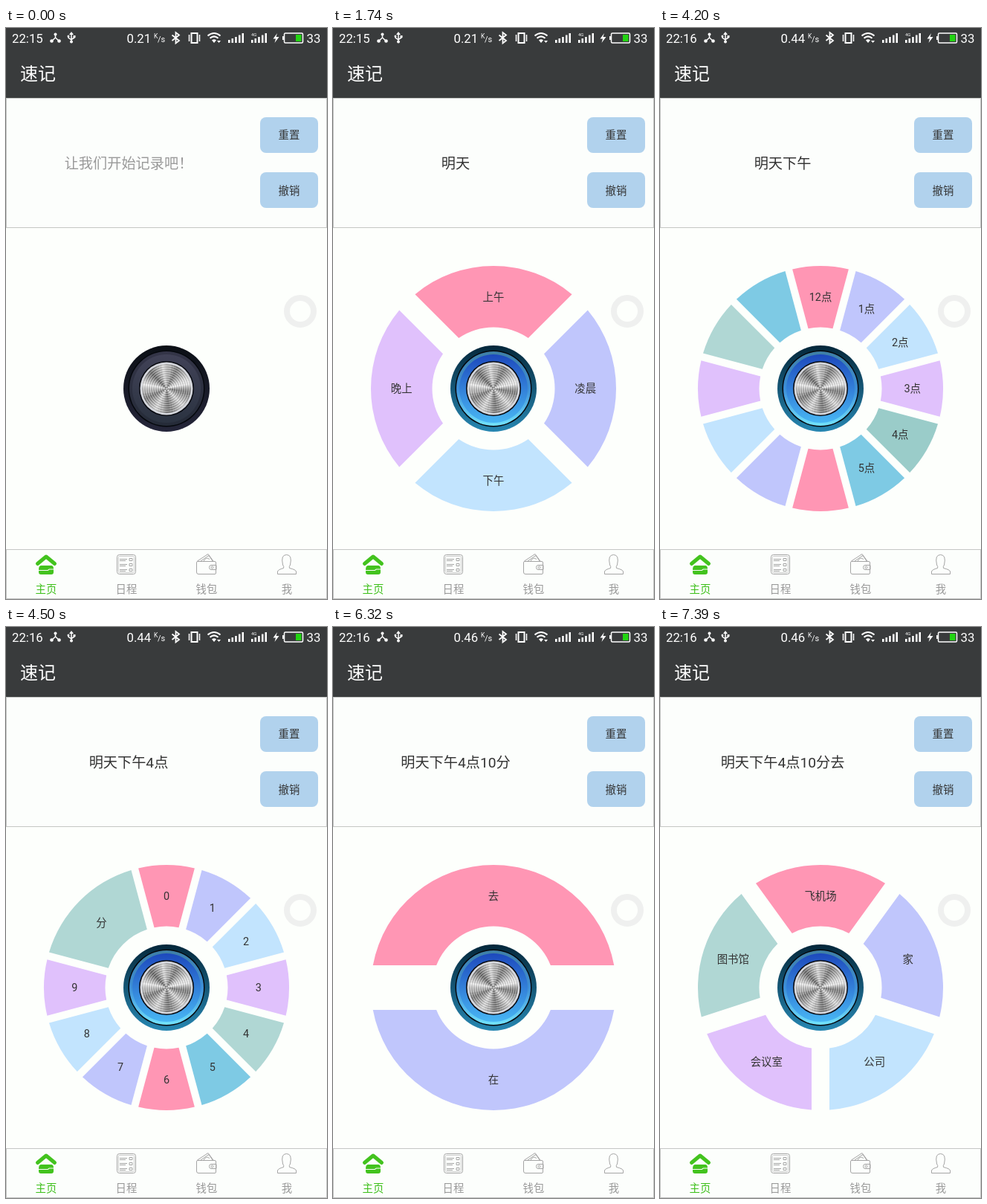
These frames come from a looping animation (432x768 px, 8 s). An HTML page:

```html
<!DOCTYPE html>
<html lang="zh-CN">
<head>
<meta charset="utf-8">
<style>
  html, body { margin: 0; width: 100%; height: 100%; overflow: hidden; background: #fdfffc; }
  svg { display: block; width: 100vw; height: 100vh; }
  text { font: 14.4px Roboto, "Noto Sans CJK SC", "Noto Sans CJK", sans-serif; fill: #333; }
  .mid { text-anchor: middle; }
  .status text { font-size: 16.8px; fill: #fff; }
  .tabs text { fill: #999; }
  .metal {
    width: 66px; height: 66px; border-radius: 50%;
    background:
      repeating-radial-gradient(circle, #fff4 0 1px, #0002 1.5px 2.5px, #fff4 3px),
      conic-gradient(from -8deg, #ddd, #777 36deg, #ddd 72deg, #eee 85deg, #777 108deg, #ddd 144deg,
        #777 180deg, #ddd 216deg, #777 252deg, #eee 288deg, #666 324deg, #ddd);
  }
</style>
</head>
<body>
<svg viewBox="0 0 432 768">
  <defs>
    <linearGradient id="offRim" x2="0" y2="1"><stop stop-color="#0b0f15"/><stop offset="1" stop-color="#25263a"/></linearGradient>
    <linearGradient id="offRing" x2="0" y2="1"><stop stop-color="#343548"/><stop offset="1" stop-color="#252b38"/></linearGradient>
    <linearGradient id="offCore" x2="0" y2="1"><stop stop-color="#414257"/><stop offset="1" stop-color="#2b3341"/></linearGradient>
    <linearGradient id="onRim" x2="0" y2="1"><stop stop-color="#04273a"/><stop offset="1" stop-color="#2787b2"/></linearGradient>
    <linearGradient id="onRing" x2="0" y2="1"><stop stop-color="#3e7fa5"/><stop offset=".5" stop-color="#3d8fd8"/><stop offset="1" stop-color="#72e2fc"/></linearGradient>
    <linearGradient id="onCore" x2="0" y2="1"><stop stop-color="#1d49bd"/><stop offset="1" stop-color="#48b6f4"/></linearGradient>
  </defs>
  <rect width="432" height="768" fill="#fdfffc"/>
  <rect width="432" height="94" fill="#393b3c"/>

  <g class="status" fill="none" stroke="#fff" stroke-width="1.5">
    <g stroke="none">
      <text id="clock" x="8" y="19.5"></text>
      <text id="speed" x="162.5" y="19.5"></text>
      <text x="199" y="14" style="font-size:8.5px">K</text>
      <text x="204" y="18.5" style="font-size:11px">/s</text>
      <text x="404.5" y="19.5">33</text>
      <text x="330" y="10.5" style="font-size:6px">4G</text>
    </g>
    <path d="M66.500 8V13L61 18M66.500 13L72 18"/>
    <g fill="#fff" stroke="none">
      <circle cx="66.500" cy="8.500" r="2"/><circle cx="61.500" cy="17.500" r="2.300"/><circle cx="71.500" cy="17.500" r="2.300"/>
      <path d="M88 5L91 9H85Z"/><circle cx="88" cy="18.500" r="2"/><circle cx="84" cy="11" r="1.500"/><path d="M90.500 10h3v3h-3z"/>
      <path d="M365 7L359.500 14.500H363L361.500 20L367.500 12H363.500Z"/>
      <path d="M299 16h2.500v4H299zM303.500 14H306v6h-2.500zM308.200 12h2.500v8h-2.500zM313 9.500h2.500V20H313zM317.500 7h2.500v13h-2.500z"/>
      <path d="M330 16h2.500v4H330zM334.500 14H337v6h-2.500zM339.200 12h2.500v8h-2.500zM344 9.500h2.500V20H344zM348.500 7h2.500v13h-2.500z"/>
      <path d="M277 16.500Q280 14 283 16.500L280 20Z"/><path d="M284 17h5l-2.500 3z"/>
      <rect x="372" y="11" width="2" height="5"/>
      <rect x="390" y="9" width="7.500" height="9" fill="#22d412"/>
    </g>
    <path d="M88 7V18M84 11V13L88 16M92 12V13L88 15.500"/>
    <path d="M223.500 9.500L233 17L228.500 20.500V6L233 9.500L223.500 17" stroke-width="1.800"/>
    <rect x="249.500" y="7" width="8" height="13" stroke-width="2"/><path d="M246.500 9V18M260.500 9V18"/>
    <path d="M271.500 10.500Q280 3.500 288.500 10.500M274.500 13.800Q280 9 285.500 13.800" stroke-width="2"/>
    <rect x="374.500" y="7" width="25" height="13" rx="1.500"/>
  </g>
  <text x="19" y="69.500" style="font-size:24px;fill:#fff">速记</text>

  <rect x=".5" y="94.500" width="431" height="174" fill="#fcfefc" stroke="#c4c6c4"/>
  <text id="note" class="mid" x="165" y="188.500" style="font-size:19.2px"></text>
  <g fill="#b1d2ed">
    <rect x="342" y="120" width="78" height="48" rx="8"/>
    <rect x="342" y="194" width="78" height="48" rx="8"/>
  </g>
  <text class="mid" x="381" y="149.300">重置</text>
  <text class="mid" x="381" y="223.800">撤销</text>

  <circle cx="396" cy="381" r="18" fill="none" stroke="#eff0ef" stroke-width="8"/>
  <g id="wheel"></g>

  <g transform="translate(216 485)">
    <circle id="rim" r="58"/>
    <circle r="51.500" fill="#05080d"/>
    <circle id="ring" r="50"/>
    <circle id="core" r="46"/>
    <circle r="37" fill="#080a10"/>
    <circle r="35.500" fill="#d5d7dd"/>
    <foreignObject x="-33" y="-33" width="66" height="66"><div class="metal"></div></foreignObject>
  </g>

  <rect x=".5" y="701.500" width="431" height="66" fill="#fcfefc" stroke="#c4c6c4"/>
  <g class="tabs mid">
    <text x="54" y="760" style="fill:#3fc01c">主页</text>
    <text x="162" y="760">日程</text>
    <text x="270" y="760">钱包</text>
    <text x="378" y="760">我</text>
  </g>
  <path d="M42.500 720.500L54 711L65.500 720.500" fill="none" stroke="#43c31e" stroke-width="5" stroke-linecap="round" stroke-linejoin="round"/>
  <path d="M47 723H61Q64 723 64 727.500H58L56 729H44Q44 723 47 723ZM44 730H56.500L58.500 728.500H64V732Q64 735 61 735H47Q44 735 44 732Z" fill="#43c31e"/>
  <g fill="none" stroke="#a5a5a5">
    <rect x="149.500" y="708.500" width="25" height="26" rx="3"/>
    <rect x="151.500" y="710.500" width="21" height="22" rx="1" stroke="#ccc"/>
    <path d="M153 714.500h10M153 716.500h8M153 721.500h10M153 723.500h8M153 728.500h10M153 730.500h8"/>
    <path d="M166 713.500h4v3h-4zM166 720.500h4v3h-4zM166 727.500h4v3h-4z"/>
    <path d="M257.500 717.500H281Q282.500 717.500 282.500 719V733Q282.500 734.500 281 734.500H259Q256.500 734.500 256.500 732V719Q256.500 717.500 259 716L272 707.500L279 717M262 717L273 709.500L278 717M266 717Q269 711 274 714.500"/>
    <path d="M283 722.500H276Q273.500 722.500 273.500 725.500T276 728.500H283Z"/><circle cx="277.500" cy="725.500" r="1.500"/>
    <path d="M365.500 734.500V731Q366 728.500 373.500 726.500Q374.500 725 372.500 722Q369.500 708.500 377.500 708.500T382.500 722Q380.500 725 381.500 726.500Q390 728.500 390.500 731V734.500Z"/>
  </g>
</svg>

<script>
const $ = id => document.getElementById(id);
const LOOP = 8000, OUTER = 165, INNER = 82.5;
const COLORS = ["#ff96b4", "#c0c6fc", "#c2e4fe", "#e0c1fc", "#b0d7d4", "#7ecae4"];
const PRESSED = ["#ff769e", "#a8b0fb", "#a9d9fe", "#d3a9fb", "#9accc9", "#5dbcdd"];

// A menu is cut into equal units; its last label takes all units left over.
const menu = (units, labels) => ({ units, labels: labels.split(" ") });
const DAYS = menu(6, "今天 明天 后天 现在 自定义时间");
const PARTS = menu(4, "上午 凌晨 下午 晚上");
const HOURS = menu(12, "12点 1点 2点 3点 4点 5点      ");
const MINUTES = menu(12, "0 1 2 3 4 5 6 7 8 9 分");
const VERBS = menu(2, "去 在");
const PLACES = menu(5, "飞机场 家 公司 会议室 图书馆");

const PROMPT = "让我们开始记录吧！";
// Each entry changes part of the state at its time (ms).
const STEPS = [
  [0, { menu: null, scale: 1, press: -1, note: PROMPT, clock: "22:15", speed: "0.21" }],
  [270, { menu: DAYS, scale: .5 }],
  [390, { scale: .96 }],
  [510, { scale: 1 }],
  [1350, { press: 1 }],
  [1500, { menu: PARTS, scale: .5, press: -1, note: "明天" }],
  [1620, { scale: .96 }],
  [1740, { scale: 1 }],
  [2360, { clock: "22:16", speed: "0.44" }],
  [2970, { menu: HOURS, scale: .5, note: "明天下午" }],
  [3120, { scale: .98 }],
  [3270, { scale: 1 }],
  [4200, { press: 4 }],
  [4350, { menu: MINUTES, scale: .6, press: -1, note: "明天下午4点" }],
  [4500, { scale: 1 }],
  [5240, { press: 1, speed: "0.46" }],
  [5360, { press: -1, note: "明天下午4点1" }],
  [5630, { press: 0 }],
  [5780, { press: -1, note: "明天下午4点10" }],
  [6020, { press: 10 }],
  [6170, { menu: VERBS, scale: .6, press: -1, note: "明天下午4点10分" }],
  [6320, { scale: 1 }],
  [6940, { press: 0 }],
  [7090, { menu: PLACES, scale: .5, press: -1, note: "明天下午4点10分去" }],
  [7240, { scale: .98 }],
  [7390, { scale: 1 }],
];

const polar = (r, a) => [r * Math.sin(a), -r * Math.cos(a)].map(v => v.toFixed(2));

function slice({ units, labels }, i, pressed) {
  const span = i === labels.length - 1 ? units - i : 1;
  const mid = (i + (span - 1) / 2) * 2 * Math.PI / units;
  const half = span * Math.PI / units;
  const edge = (r, side) => polar(r, mid + side * (half - Math.asin(60 / units / r)));
  const [x, y] = polar((OUTER + INNER) / 2, mid);
  const color = (pressed ? PRESSED : COLORS)[i % COLORS.length];
  return `<path fill="${color}" d="M${edge(INNER, -1)}L${edge(OUTER, -1)}
    A${OUTER} ${OUTER} 0 0 1 ${edge(OUTER, 1)}L${edge(INNER, 1)}
    A${INNER} ${INNER} 0 0 0 ${edge(INNER, -1)}Z"/>
    <text class="mid" x="${x}" y="${+y + 5.3}">${labels[i]}</text>`;
}

function render(s) {
  $("clock").textContent = s.clock;
  $("speed").textContent = s.speed;
  $("note").textContent = s.note;
  $("note").style.fill = s.note === PROMPT ? "#999" : "#333";
  for (const part of ["Rim", "Ring", "Core"])
    $(part.toLowerCase()).setAttribute("fill", `url(#${s.menu ? "on" : "off"}${part})`);
  $("wheel").setAttribute("transform", `translate(216 485) scale(${s.scale})`);
  $("wheel").innerHTML = s.menu
    ? s.menu.labels.map((_, i) => slice(s.menu, i, i === s.press)).join("") : "";
}

const start = performance.now();
let shown = 0;
function frame() {
  const t = (performance.now() - start) % LOOP;
  const past = STEPS.filter(([at]) => at <= t);
  if (past.length !== shown) {
    shown = past.length;
    render(Object.assign({}, ...past.map(([, change]) => change)));
  }
  requestAnimationFrame(frame);
}
frame();
</script>
</body>
</html>
```
